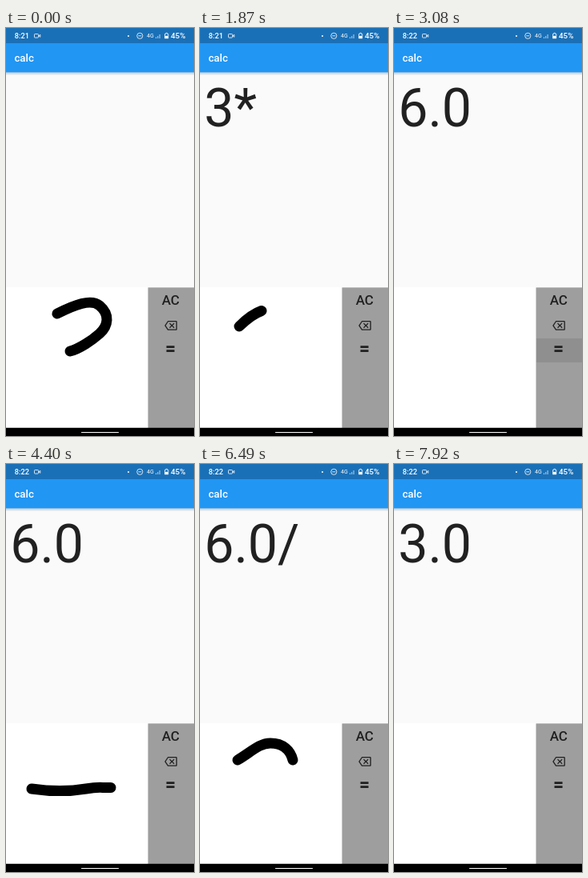
Recreate the animation shown at these times as an HTML page. Size 235 by 510 pixels, loop 8 s.

```html
<!DOCTYPE html>
<html lang="en">
<head>
<meta charset="utf-8">
<title>calc</title>
<style>
  html, body { margin: 0; width: 100%; height: 100%; overflow: hidden; background: #fafafa; }
  svg { display: block; width: 235px; height: 510px; font-family: Roboto, sans-serif; }
  .bar { fill: #fff; font-weight: 500; }
  .key { fill: #212121; font-weight: 500; text-anchor: middle; }
  #ink { fill: none; stroke: #000; stroke-width: 13; stroke-linecap: round; stroke-linejoin: round; }
</style>
</head>
<body>
<svg viewBox="0 0 235 510">
  <defs>
    <linearGradient id="shade" x2="0" y2="1">
      <stop stop-color="#000" stop-opacity=".2"/>
      <stop offset="1" stop-color="#000" stop-opacity="0"/>
    </linearGradient>
  </defs>
  <rect width="235" height="510" fill="#fafafa"/>
  <rect y="55.5" width="235" height="4" fill="url(#shade)"/>
  <rect width="235" height="55.5" fill="#2196f3"/>
  <rect width="235" height="19" fill="#1a70b7"/>

  <g class="bar">
    <text id="clock" x="10.8" y="13" font-size="9.2">8:21</text>
    <text x="176" y="12" font-size="7" font-weight="400">4G</text>
    <text x="206" y="13" font-size="9.8">45%</text>
    <text x="10.4" y="42" font-size="13.3">calc</text>
    <circle cx="153" cy="10" r="1"/>
    <path d="M187 13v-1.5h1V13zM189.3 13v-3h1v3zM191.6 13V8h1v5z" opacity=".7"/>
    <path d="M198.2 9.8h4.9v3.4h-4.9z"/>
    <g fill="none" stroke="#fff" stroke-width=".8">
      <path d="M198.6 10V7.4h1.2V6.3h1.8v1.1h1.2V10"/>
      <rect x="35.5" y="7.5" width="5" height="4.6" rx=".8"/>
      <path d="M41 9.8l1.8-1.5v3z"/>
      <circle cx="167.3" cy="9.8" r="3.6"/>
      <path d="M165.3 9.8h4"/>
    </g>
  </g>

  <text id="result" x="5.2" y="123.2" font-size="66.2" fill="#212121"></text>

  <rect y="324" width="178" height="176" fill="#fff"/>
  <g id="ink"></g>

  <rect x="177.5" y="324.4" width="57.5" height="175.6" fill="#9e9e9e"/>
  <rect id="press" x="178" y="388" width="57" height="30" fill="#8f8f8f"/>
  <text class="key" x="205.8" y="346" font-size="17">AC</text>
  <path transform="translate(198.2 364.1) scale(.653)" fill="#212121" d="M22 3H7c-.69 0-1.23.35-1.59.88L0 12l5.41 8.11c.36.53.9.89 1.59.89h15c1.1 0 2-.9 2-2V5c0-1.1-.9-2-2-2zm0 16H7.07L2.4 12l4.66-7H22v14zm-11.59-2L14 13.41 17.59 17 19 15.59 15.41 12 19 8.41 17.59 7 14 10.59 10.41 7 9 8.41 12.59 12 9 15.59z"/>
  <text class="key" x="205.6" y="409.2" font-size="23" style="font-weight:700">=</text>

  <rect y="499.75" width="235" height="10.25"/>
  <rect x="94" y="505" width="47" height="1" rx=".5" fill="#fff"/>
</svg>
<script>
const LOOP = 8000, STEP = 110;
const $ = id => document.getElementById(id);

// [path, pen down, stroke complete, pad cleared]
const strokes = [
  // three
  ['M64 357C86 346 106 338 117 347C130 358 128 372 117 382C108 390 92 401 80 404', -440, 0, 660],
  ['M80 404C100 397 122 402 124 422C126 444 100 464 68 468', 0, 440, 660],
  // times
  ['M52 365C75 392 98 420 122 446', 880, 1100, 1650],
  ['M122 366C98 394 75 420 50 444', 1210, 1430, 1650],
  // two
  ['M49 373C58 364 67 357 77 353.5', 1760, 1870, 2530],
  ['M77 353.5C102 344 120 358 113 384C104 412 76 436 52 454C78 448 104 450 132 454', 1870, 2310, 2530],
  // divide
  ['M32 406C60 410 82 409 100 406S118 405 131 404.5', 3960, 4400, 5170],
  ['M84 367h.5', 4510, 4620, 5170],
  ['M84 445h.5', 4730, 4840, 5170],
  // two
  ['M47 370C64 360 74 349 88 349C104 349 113 358 116 370', 6270, 6490, 7260],
  ['M116 370C118 396 84 430 54 454C78 447 106 449 134 453', 6490, 6930, 7260],
];

const results = [
  [0, ''], [660, '3'], [1650, '3*'], [2530, '3*2'], [2970, '6.0'],
  [5170, '6.0/'], [7260, '6.0/2'], [7590, '3.0'],
];
const presses = [[2970, 3190], [7590, 7810]];
const within = (t, a, b) => t >= a && t < b;

const paths = strokes.map(([d]) => {
  const p = document.createElementNS('http://www.w3.org/2000/svg', 'path');
  p.setAttribute('d', d);
  p.setAttribute('pathLength', 1);
  return $('ink').appendChild(p);
});

function draw(t) {
  strokes.forEach(([, start, end, clear], i) => {
    const shown = Math.min(1, (t - start) / (end - start));
    paths[i].style.display = shown > 0 && t < clear ? '' : 'none';
    paths[i].style.strokeDasharray = shown < 1 ? `${Math.max(0, shown)} 2` : 'none';
  });
  $('result').textContent = results.filter(([at]) => t >= at).pop()[1];
  $('clock').textContent = t < 2420 ? '8:21' : '8:22';
  $('press').style.display = presses.some(([a, b]) => within(t, a, b)) ? '' : 'none';
}

const begin = performance.now();
function tick() {
  const t = (performance.now() - begin) % LOOP;
  draw(Math.floor(t / STEP) * STEP);
  requestAnimationFrame(tick);
}
tick();
</script>
</body>
</html>
```
